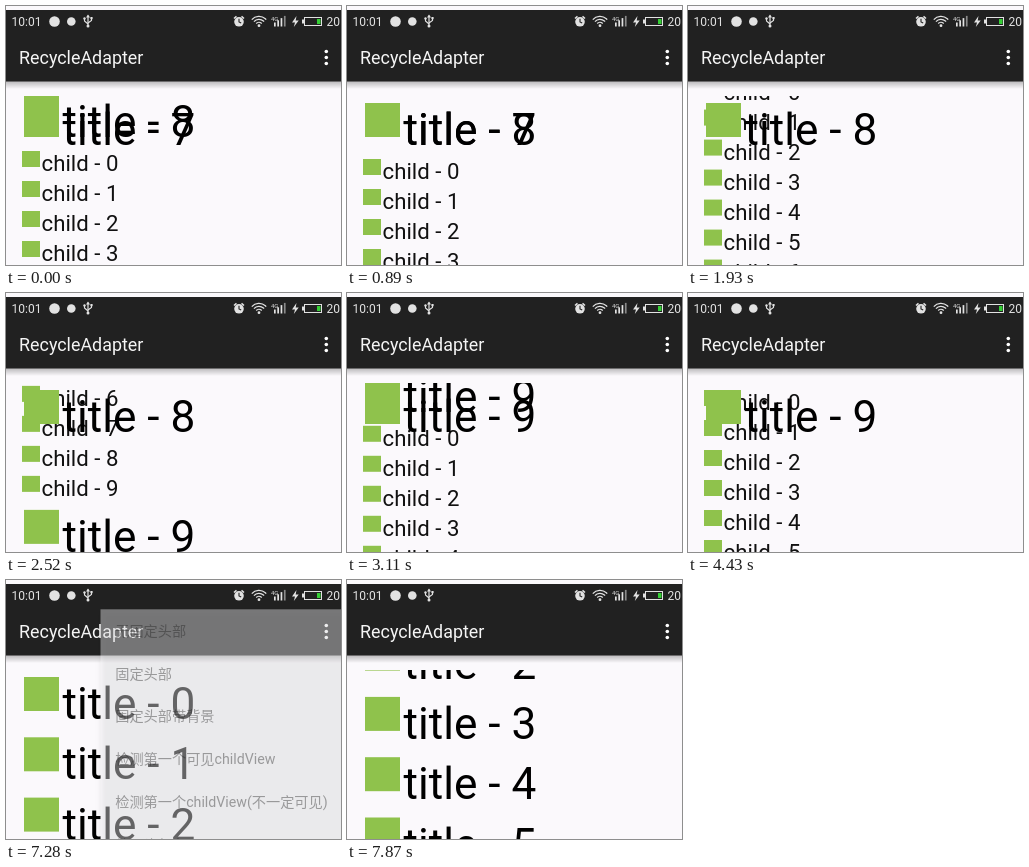
An HTML page with a canvas that plays this animation: 335 by 259 pixels, repeating every 8 s.

```html
<!DOCTYPE html>
<html lang="zh">
<head>
<meta charset="utf-8">
<style>
html, body { margin: 0; width: 100%; height: 100%; overflow: hidden; background: #fbf9fc; }
canvas { display: block; }
</style>
</head>
<body>
<canvas id="stage" width="335" height="259"></canvas>
<script>
const W = 335, H = 259, LOOP = 8000, STEP = 148.2;
const LIST_TOP = 90, TITLE_H = 60.3, CHILD_H = 30, CHILDREN = 10;
const GROUP_H = 60 + CHILD_H * CHILDREN;
const PAPER = '#fbf9fc', DARK = '#212121', GREEN = '#8fc24c', LIGHT = '#e2e2e2';
const FONT = 'Roboto, "Noto Sans CJK SC", "Noto Sans CJK", sans-serif';
const MENU = ['无固定头部', '固定头部', '固定头部带背景', '检测第一个可见childView',
  '检测第一个childView(不一定可见)', '处理头部布局'];

// Scroll keys: time, offset of group 8, velocity in px per ms.
const SCROLL = [[0, -8, 0], [890, 0, 0], [1930, -80, -0.17], [3110, -380, -0.1], [3850, -416, 0]];

const ctx = document.getElementById('stage').getContext('2d');

function text(str, x, y, size, color = '#000') {
  ctx.font = `${size}px ${FONT}`;
  ctx.fillStyle = color;
  ctx.fillText(str, x, y);
}

function rect(x, y, w, h, color) {
  ctx.fillStyle = color;
  ctx.fillRect(x, y, w, h);
}

function dot(x, y, r, color) {
  ctx.fillStyle = color;
  ctx.beginPath();
  ctx.arc(x, y, r, 0, Math.PI * 2);
  ctx.fill();
}

function line(points, width, color) {
  ctx.strokeStyle = color;
  ctx.lineWidth = width;
  ctx.beginPath();
  points.forEach(([x, y]) => ctx.lineTo(x, y));
  ctx.stroke();
}

function polygon(points, color) {
  ctx.fillStyle = color;
  ctx.beginPath();
  points.forEach(([x, y]) => ctx.lineTo(x, y));
  ctx.fill();
}

function scrollAt(t) {
  const last = SCROLL[SCROLL.length - 1];
  if (t >= last[0]) return last[1];
  const i = SCROLL.findIndex(key => key[0] > t) - 1;
  const [t0, y0, v0] = SCROLL[i], [t1, y1, v1] = SCROLL[i + 1];
  const d = t1 - t0, u = (t - t0) / d, u2 = u * u, u3 = u2 * u;
  return y0 * (2 * u3 - 3 * u2 + 1) + y1 * (3 * u2 - 2 * u3)
    + d * (v0 * (u3 - 2 * u2 + u) + v1 * (u3 - u2));
}

function titleRow(n, top) {
  rect(18, top + 7, 35, 34, GREEN);
  text('title - ' + n, 56.5, top + 49, 44.2);
}

function childRow(n, top) {
  rect(16, top + 3, 18, 16, GREEN);
  text('child - ' + n, 35.6, top + 23, 22.2, '#111');
}

function groupedList(scroll) {
  for (let g = 7; g <= 9; g++) {
    const top = LIST_TOP + scroll + (g - 8) * GROUP_H;
    titleRow(g, top);
    for (let c = 0; c < CHILDREN; c++) childRow(c, top + 60 + c * CHILD_H);
  }
  // The pinned header changes once the next title has mostly passed it.
  titleRow(8 + Math.floor((-scroll - 14) / GROUP_H), LIST_TOP);
}

function plainList(scroll) {
  for (let n = 0; n < 7; n++) titleRow(n, LIST_TOP + n * TITLE_H - scroll);
}

function usbIcon() {
  line([[82, 9.5], [82, 20]], 1.2, LIGHT);
  line([[78.5, 12.5], [78.5, 15], [82, 18]], 1.1, LIGHT);
  line([[85.5, 12], [85.5, 14.5], [82, 17]], 1.1, LIGHT);
  polygon([[80, 11.5], [82, 8.5], [84, 11.5]], LIGHT);
  dot(82, 20, 1.5, LIGHT);
  dot(78.5, 12.5, 1.2, LIGHT);
  rect(84.4, 11, 2.2, 2.2, LIGHT);
}

function alarmIcon() {
  dot(233, 15.8, 4.8, LIGHT);
  line([[228, 12.5], [230.5, 10.3]], 1.6, LIGHT);
  line([[235.5, 10.3], [238, 12.5]], 1.6, LIGHT);
  line([[233, 12.8], [233, 16], [235.2, 17]], 1.1, DARK);
}

function wifiIcon(active) {
  ctx.strokeStyle = LIGHT;
  ctx.lineWidth = 1.3;
  [3.7, 6.7, 9.6].forEach(r => {
    ctx.beginPath();
    ctx.arc(253, 20, r, -Math.PI * 0.77, -Math.PI * 0.23);
    ctx.stroke();
  });
  dot(253, 19.7, 1.4, LIGHT);
  if (active) polygon([[256, 18.5], [260, 18.5], [258, 21]], LIGHT);
}

function statusBar(t) {
  text('10:01', 5.6, 19.6, 12, LIGHT);
  dot(48.5, 15.5, 5.3, LIGHT);
  dot(65.3, 15.5, 4.3, LIGHT);
  usbIcon();
  alarmIcon();
  wifiIcon((t >= 3400 && t < 4430) || (t >= 5180 && t < 7280));
  text('4G', 265, 14.5, 6, LIGHT);
  for (let i = 0; i < 4; i++) {
    const h = 4 + i * 2.2;
    rect(268 + i * 3.3, 20.5 - h, 1.7, h, i < 3 ? LIGHT : '#8a8a8a');
  }
  polygon([[290.5, 10], [286, 16.5], [289, 16.5], [287.8, 21], [292.7, 14.5], [289.7, 14.5]], LIGHT);
  ctx.strokeStyle = LIGHT;
  ctx.lineWidth = 1;
  ctx.strokeRect(298.5, 11.5, 17, 8);
  rect(296, 13.5, 2, 4, LIGHT);
  rect(311, 13, 3.5, 5, '#35cf35');
  text('20', 320.5, 19.6, 12, LIGHT);
}

function appBar(t) {
  const shadow = ctx.createLinearGradient(0, 75, 0, 83);
  shadow.addColorStop(0, 'rgba(0,0,0,.27)');
  shadow.addColorStop(1, 'rgba(0,0,0,0)');
  rect(0, 75, W, 8, shadow);
  rect(0, 4, W, 71.5, DARK);
  statusBar(t);
  text('RecycleAdapter', 13, 58, 17.9, '#f5f5f5');
  [45.5, 51.5, 57.5].forEach(y => dot(320.3, y, 1.8, '#fff'));
}

function menu(open, alpha) {
  const w = 245.5 * open, h = 240 * open, x = 340 - w, y = 29.3;
  ctx.save();
  ctx.globalAlpha = alpha;
  ctx.shadowColor = 'rgba(0,0,0,.28)';
  ctx.shadowBlur = 5;
  ctx.shadowOffsetY = 2;
  rect(x, y, w, h, PAPER);
  ctx.shadowColor = 'transparent';
  ctx.beginPath();
  ctx.rect(x, y, w, h);
  ctx.clip();
  ctx.globalAlpha = alpha * open;
  MENU.forEach((label, i) => text(label, 109.2, 56 + i * 42.7, 14.2, DARK));
  ctx.restore();
}

function draw(t) {
  const stepped = Math.floor((t + 10) / STEP) * STEP;
  rect(0, 0, W, H, PAPER);
  ctx.save();
  ctx.beginPath();
  ctx.rect(0, LIST_TOP, W, H - LIST_TOP);
  ctx.clip();
  if (t < 7280) groupedList(scrollAt(stepped));
  else plainList(t < 7870 ? 0 : 161);
  ctx.restore();
  appBar(t);
  if (t >= 5180 && t < 7430) {
    const open = t < 5330 ? 0.4 : t < 5480 ? 0.85 : 1;
    menu(open, t < 7280 ? 1 : 0.4);
  }
}

function tick() {
  draw(performance.now() % LOOP);
  requestAnimationFrame(tick);
}
tick();
</script>
</body>
</html>
```
